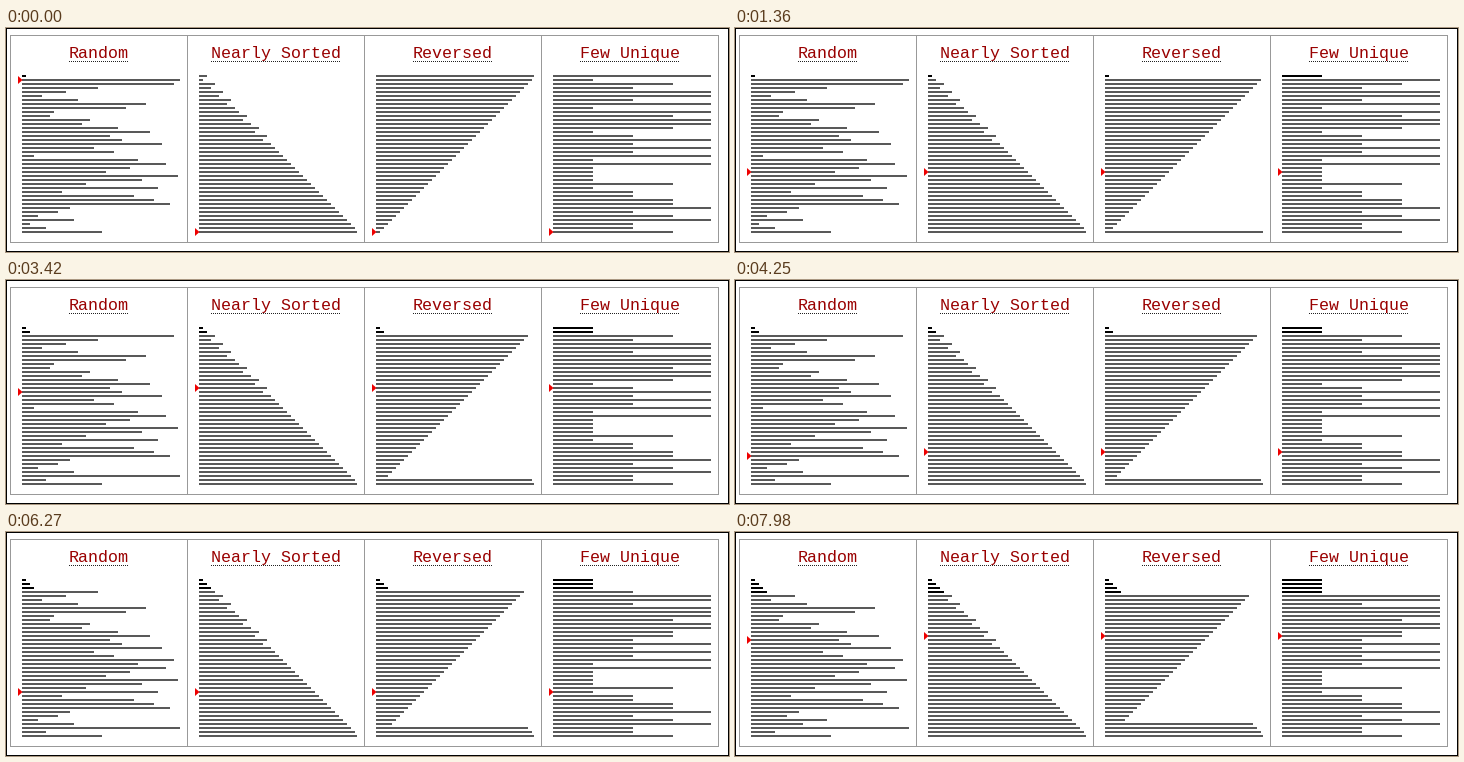
Write a matplotlib script that moves like this. It is 723x224 px and loops after 8 s.

```python
import matplotlib.pyplot as plt
import numpy as np
from matplotlib.animation import FuncAnimation
from matplotlib.collections import PolyCollection

W, H, DPI = 723, 224, 100
STEP_MS, LOOP_MS = 20, 8000
N, PITCH, ROW0, MAX_LEN = 40, 4, 48, 158
PANEL_W, PANEL_X, TOP, BOTTOM = 177, 4, 7, 214
BAR, DONE, RULE, TITLE = "#595959", "#000000", "#999999", "#990000"

# Time in ms against the number of comparisons made so far
CLOCK = [(0, 0), (130, 1), (860, 15), (920, 16), (1330, 23), (1390, 24),
         (1720, 31), (2520, 41), (2590, 42), (3320, 52), (3420, 53),
         (4160, 68), (4250, 69), (4990, 83), (5120, 84), (5920, 99),
         (6240, 102), (6700, 108), (6800, 109), (7560, 119), (7690, 120),
         (7980, 125)]
TIMES, STEPS = zip(*CLOCK)


def nearly_sorted():
    vals = list(range(1, N + 1))
    for i in (0, 2, 4, 6, 10, 13, 15):
        vals[i], vals[i + 1] = vals[i + 1], vals[i]
    return vals


SHUFFLED = [1, 40, 38, 19, 11, 5, 14, 31, 26, 8, 7, 17, 15, 24, 32, 22, 25, 35,
            18, 23, 3, 29, 36, 27, 21, 39, 30, 16, 34, 10, 28, 33, 37, 12, 9,
            4, 13, 2, 6, 20]
FEW = [10 * int(c) for c in "4132442414" "3443124242" "4141111312" "2334234223"]
PANELS = [("Random", SHUFFLED), ("Nearly Sorted", nearly_sorted()),
          ("Reversed", list(range(N, 0, -1))), ("Few Unique", FEW)]


def selection_passes(vals, count=5):
    """Array contents at the start of each selection-sort pass."""
    vals, out = list(vals), []
    for i in range(count):
        out.append(list(vals))
        k = vals.index(min(vals[i:]), i)
        vals[i], vals[k] = vals[k], vals[i]
    return out


def steps_at(t):
    return int(np.floor(np.interp(t, TIMES, STEPS) + 1e-6))


def lagging_steps(t):
    """The other panels trail the first one on every odd step."""
    if t < 100:
        return -1
    s = steps_at(t)
    return s - 1 if s % 2 and steps_at(t - 30) < s else s


def locate(s):
    """Pass number and scanned row after s steps."""
    if s < 0:
        return 0, N - 1
    p = 1
    while s > N - 1 - p:
        s -= N - p
        p += 1
    return p, p + s


def box(x0, y0, x1, y1):
    return [(x0, y0), (x1, y0), (x1, y1), (x0, y1)]


def bar(x, row, value):
    y = ROW0 + PITCH * row
    return box(x, y - 1, x + min(PITCH * value, MAX_LEN), y + 1)


def pointer(x, row):
    y = ROW0 + PITCH * row
    return [(x - 4, y - 4), (x + 0.5, y), (x - 4, y + 4)]


fig = plt.figure(figsize=(W / DPI, H / DPI), dpi=DPI, facecolor="white")
ax = fig.add_axes([0, 0, 1, 1])
ax.set_xlim(0, W)
ax.set_ylim(H, 0)
ax.axis("off")


def polys(verts, color, smooth=False):
    coll = PolyCollection(verts, facecolors=color, edgecolors="none",
                          linewidths=0, antialiaseds=smooth)
    return ax.add_collection(coll, autolim=False)


polys([box(0, 0, W, 1), box(0, H - 1, W, H), box(0, 0, 1, H),
       box(W - 1, 0, W, H)], "black")
right = PANEL_X + 4 * PANEL_W
polys([box(PANEL_X, y, right + 1, y + 1) for y in (TOP, BOTTOM)]
      + [box(x, TOP, x + 1, BOTTOM + 1)
         for x in range(PANEL_X, right + 1, PANEL_W)], RULE)

dots, sorts = [], []
for i, (name, vals) in enumerate(PANELS):
    left = PANEL_X + i * PANEL_W
    mid, half = left + 89, 5 * len(name)
    ax.text(mid, 30, name, family="Liberation Mono", size=12, color=TITLE,
            ha="center", va="baseline")
    dots += [box(x, 33, x + 1, 34) for x in range(mid - half, mid + half, 2)]
    sorts.append((left + 12, selection_passes(vals)))
polys(dots, "#222222")

bars = polys([box(0, 0, 1, 1)], BAR)
marks = polys([box(0, 0, 1, 1)], "#ee0000", smooth=True)


def update(n):
    t = n * STEP_MS + STEP_MS / 2
    verts, colors, heads = [], [], []
    for i, (x, passes) in enumerate(sorts):
        done, row = locate(lagging_steps(t) if i else steps_at(t))
        verts += [bar(x, r, v) for r, v in enumerate(passes[done])]
        colors += [DONE] * done + [BAR] * (N - done)
        heads.append(pointer(x, row))
    bars.set_verts(verts)
    bars.set_facecolor(colors)
    marks.set_verts(heads)
    return bars, marks


anim = FuncAnimation(fig, update, frames=LOOP_MS // STEP_MS, interval=STEP_MS,
                     repeat=True, repeat_delay=0, blit=False)
plt.show()
```
